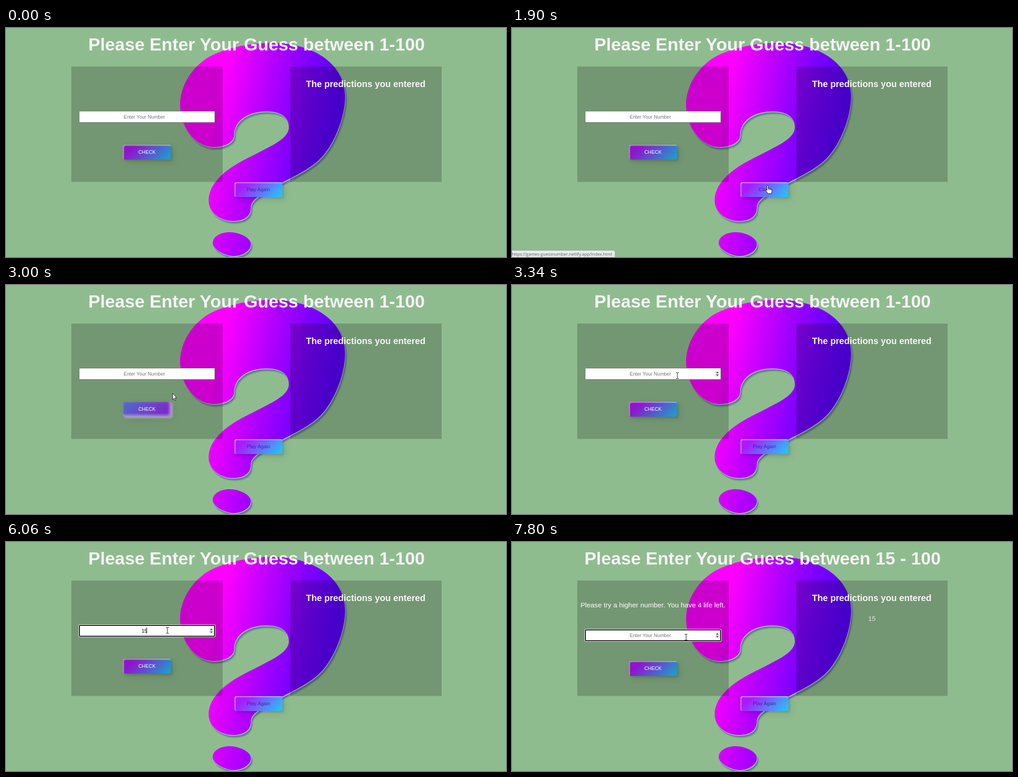
An HTML page for the animation above (8 s loop, 1103x508 px).

```html
<!DOCTYPE html>
<html lang="en">
<head>
<meta charset="utf-8">
<title>Guess the number</title>
<style>
  html, body { margin: 0; width: 100%; height: 100%; overflow: hidden; background: #8fbc8f; }
  #stage { position: relative; width: 1103px; height: 508px; overflow: hidden; }
  svg { position: absolute; left: 0; top: 0; }
  text, .btn { font-family: "Liberation Sans", Arial, sans-serif; }
  .mid { text-anchor: middle; }
  .head { font-weight: bold; fill: #f5f5f5; }
  .btn { position: absolute; width: 106px; height: 33px; font-size: 10.9px; line-height: 33px; text-align: center; }
  .face {
    position: absolute; inset: 0; border-radius: 4px;
    background: linear-gradient(135deg, #a91bff 20%, #2bbdfd 92%);
    box-shadow: inset 2px 2px 2px rgba(255,255,255,.5), 6px 6px 16px rgba(0,0,0,.1), 3px 3px 4px rgba(0,0,0,.12);
  }
  #play { left: 503.5px; top: 341.5px; perspective: 187px; color: rgba(20,0,40,.55); }
  #play .face { transform-origin: 50% 50% -16.5px; backface-visibility: hidden; }
  #check { left: 258px; top: 259px; color: #fff; }
  #check .face { background: linear-gradient(135deg, #9014cc 20%, #2298cc 92%); }
  #check .lit {
    background: linear-gradient(135deg, #4a74cc 8%, #8a1ac8 88%);
    box-shadow: inset -4px -4px 5px rgba(255,255,255,.45), inset 3px 3px 5px rgba(116,125,136,.3),
      3px 3px 5px rgba(255,255,255,.5), -3px -3px 5px rgba(116,125,136,.2);
  }
  #check span { position: relative; }
</style>
</head>
<body>
<div id="stage">
  <svg width="1103" height="508">
    <defs>
      <linearGradient id="ink" gradientUnits="userSpaceOnUse" x1="470" y1="150" x2="720" y2="200">
        <stop offset="0" stop-color="#ff00ff"/>
        <stop offset=".42" stop-color="#b000ff"/>
        <stop offset=".73" stop-color="#7a00ff"/>
        <stop offset="1" stop-color="#5a00fa"/>
      </linearGradient>
      <filter id="soft"><feGaussianBlur stdDeviation="1.6"/></filter>
      <g id="mark">
        <path d="M503 238C503 206 533 185 574 185S624 204 624 220S608 249 588 260
          C557 277 533 288 512 300C472 323 447 352 447 382C447 409 472 428 500 428S540 416 540 398
          C540 388 547 381 556 374C572 362 590 353 609 343C648 323 674 309 693 290C723 260 748 199 748 152
          C748 84 684 33 585 33C540 33 484 44 448 64C410 86 384 129 384 170C384 218 416 264 458 264
          C483 264 503 253 503 238Z"/>
        <path d="M456 476C457 461 475 453 494 453S540 464 540 480S518 506 502 506S455 492 456 476Z"/>
      </g>
    </defs>
    <rect width="1103" height="508" fill="#8fbc8f"/>
    <use href="#mark" x="3.5" y="5.5" fill="#3f5a70" opacity=".65" filter="url(#soft)"/>
    <use href="#mark" x="1.2" y="2" fill="#aab4d2"/>
    <use href="#mark" fill="url(#ink)"/>
    <path d="M144 85.5h334v256h-334zM627 85.5h334v256h-334z" fill="#000" opacity=".2"/>
    <text id="title" class="mid head" x="552.7" y="49.5" font-size="39.25"></text>
    <text class="mid head" x="793.5" y="131" font-size="19.7">The predictions you entered</text>
    <text id="hint" class="mid" x="311" y="144.5" font-size="15.3" fill="#fff">Please try a higher number. You have 4 life left.</text>
    <text id="past" class="mid" x="794" y="175" font-size="14.3" fill="#dfe8df">15</text>
    <g id="field">
      <rect id="plain" x="161.5" y="184.5" width="299" height="25" fill="#fff" stroke="#767676"/>
      <g id="focus">
        <rect x="160" y="183" width="302" height="28" rx="3" fill="#fff"/>
        <rect x="162" y="185" width="298" height="24" rx="1" fill="#fff" stroke="#101010" stroke-width="2"/>
      </g>
      <g id="spin">
        <rect x="448" y="190" width="10" height="14" fill="#efefef"/>
        <path d="M450 195.5l3-3.5 3 3.5zM450 198.5l3 3.5 3-3.5z" fill="#4a4a4a"/>
      </g>
      <text id="value" class="mid" x="305.2" y="201" font-size="10.75"></text>
      <rect id="caret" y="190" width="1" height="13"/>
    </g>
  </svg>
  <div id="check" class="btn">
    <div class="face"></div>
    <div class="face lit" id="lit"></div>
    <span>CHECK</span>
  </div>
  <div id="play" class="btn">
    <div class="face" id="front">Play Again</div>
    <div class="face" id="top">Click!</div>
  </div>
  <svg width="1103" height="508">
    <g id="status">
      <path d="M-1 509V493.5H224q3 0 3 3V509z" fill="#e8ebee" stroke="#a9b5ad"/>
      <text x="-.5" y="505" font-size="9.35" fill="#5a5f63" style="font-family:'Open Sans','Noto Sans',sans-serif">https://games-guessnumber.netlify.app/index.html</text>
    </g>
    <g id="cursor" stroke="#000" fill="#fff">
      <path id="arrow" d="M.5 .5V14L3.6 11.2 5.6 16 7.7 15.1 5.7 10.4H9.6Z" stroke-width=".9"/>
      <path id="hand" transform="translate(-5.5 -.5)" d="M4 12V2a1.5 1.5 0 0 1 3 0v5.2q2.4-.8 2.8.9 2-.6 2.6.8 2.4-.3 2.4 1.8v3.3q0 2-1.5 5H6q-1-2.4-4-5.6Q.4 11.6.6 10.8q1-1.3 3.4 1.2zM7 7v4M9.8 8.2v3M12.4 9v2.4"/>
      <path id="beam" d="M-3-6.5h2.2l.8.8.8-.8H3M-3 6.5h2.2l.8-.8.8.8H3M0-5.7V5.7" fill="none"/>
    </g>
  </svg>
</div>
<script>
const LOOP = 8000, STEP = 70, BLINK = 530;
const ENTER = 390, FOCUS = 3680, GUESS = 6260;
const el = id => document.getElementById(id);
const show = (id, on) => { el(id).style.visibility = on ? "visible" : "hidden"; };

// Key points of the pointer; it rests where two neighbours share a place.
const inPlay = { x: 563.5, y: 348.5 }, inCheck = { x: 345, y: 282 }, inField = { x: 356, y: 195.5 };
const path = [
  { t: ENTER, x: 986, y: 500 },
  { t: 1160, x: 588, y: 351 },
  { t: 1440, ...inPlay },
  { t: 1900, ...inPlay },
  { t: 2250, x: 362, y: 287 },
  { t: 2530, ...inCheck },
  { t: 2860, ...inCheck },
  { t: 3000, x: 367, y: 239.5 },
  { t: 3140, x: 371.5, y: 205 },
  { t: 3490, ...inField },
  { t: 7660, ...inField },
  { t: 7800, x: 383.5, y: 210.5 }
];

// Each key event sets the field and restarts the caret's blink.
const keys = [
  { t: FOCUS, text: "" }, { t: 4670, text: "1" }, { t: 5000, text: "15" }, { t: GUESS - 250, text: "15" }
];

const legAt = t => Math.max(0, path.findLastIndex(p => p.t <= t));

// The screen refreshes every STEP while the pointer moves.
function held(t) {
  const from = path[legAt(t)].t;
  return t < from ? 0 : from + Math.floor((t - from) / STEP) * STEP;
}

function place(t) {
  const i = legAt(t), a = path[i], b = path[i + 1];
  if (!b || t < a.t) return a;
  const k = (t - a.t) / (b.t - a.t);
  return { x: a.x + (b.x - a.x) * k, y: a.y + (b.y - a.y) * k };
}

function pointerOver({ x, y }, guessed) {
  const hit = (l, t, w, h) => x >= l && x <= l + w && y >= t && y <= t + h;
  if (hit(160, guessed ? 193 : 183, 302, 28)) return "beam";
  return hit(258, 259, 106, 33) || hit(503, 341, 107, 33) ? "hand" : "arrow";
}

// CSS "ease", cubic-bezier(.25, .1, .25, 1)
function ease(x) {
  if (x <= 0) return 0;
  if (x >= 1) return 1;
  const curve = (s, p, q) => 3 * s * (1 - s) ** 2 * p + 3 * s * s * (1 - s) * q + s ** 3;
  let lo = 0, hi = 1;
  for (let i = 0; i < 24; i++) {
    const s = (lo + hi) / 2;
    if (curve(s, .25, .25) < x) lo = s; else hi = s;
  }
  return curve(lo, .1, 1);
}
const hover = (t, enter, leave) => ease((t - enter) / 300) - ease((t - leave) / 300);

function draw(t) {
  const q = held(t), tip = place(q);
  const guessed = t >= GUESS, focused = t >= FOCUS;

  el("title").textContent = "Please Enter Your Guess between " + (guessed ? "15 - 100" : "1-100");
  show("hint", guessed);
  show("past", guessed);

  const turn = 90 * hover(q, 1090, 1970);
  el("front").style.transform = `rotateX(${-turn}deg)`;
  el("top").style.transform = `rotateX(${90 - turn}deg)`;
  show("front", turn < 89.9);
  show("top", turn > .1);

  el("check").style.transform = `translateY(${guessed ? 5 : 0}px)`;
  el("lit").style.opacity = hover(q, 2240, 2965);

  const key = keys.findLast(k => k.t <= t);
  const value = key && !guessed ? key.text : "";
  el("field").setAttribute("transform", `translate(0 ${guessed ? 10 : 0})`);
  show("plain", !focused);
  show("focus", focused);
  el("value").textContent = value || "Enter Your Number";
  el("value").setAttribute("fill", value ? "#000" : "#757575");
  el("caret").setAttribute("x", Math.floor(305 + value.length * 2.9));
  show("caret", key && Math.floor((t - key.t) / BLINK) % 2 === 0);

  show("status", q >= 1300 && q < 2320);

  const kind = pointerOver(tip, guessed);
  show("spin", focused || kind === "beam");
  for (const id of ["arrow", "hand", "beam"]) show(id, t >= ENTER && id === kind);
  el("cursor").setAttribute("transform", `translate(${Math.round(tip.x)} ${Math.round(tip.y)})`);
}

const begin = performance.now();
function tick() {
  draw((performance.now() - begin) % LOOP);
  requestAnimationFrame(tick);
}
tick();
</script>
</body>
</html>
```
